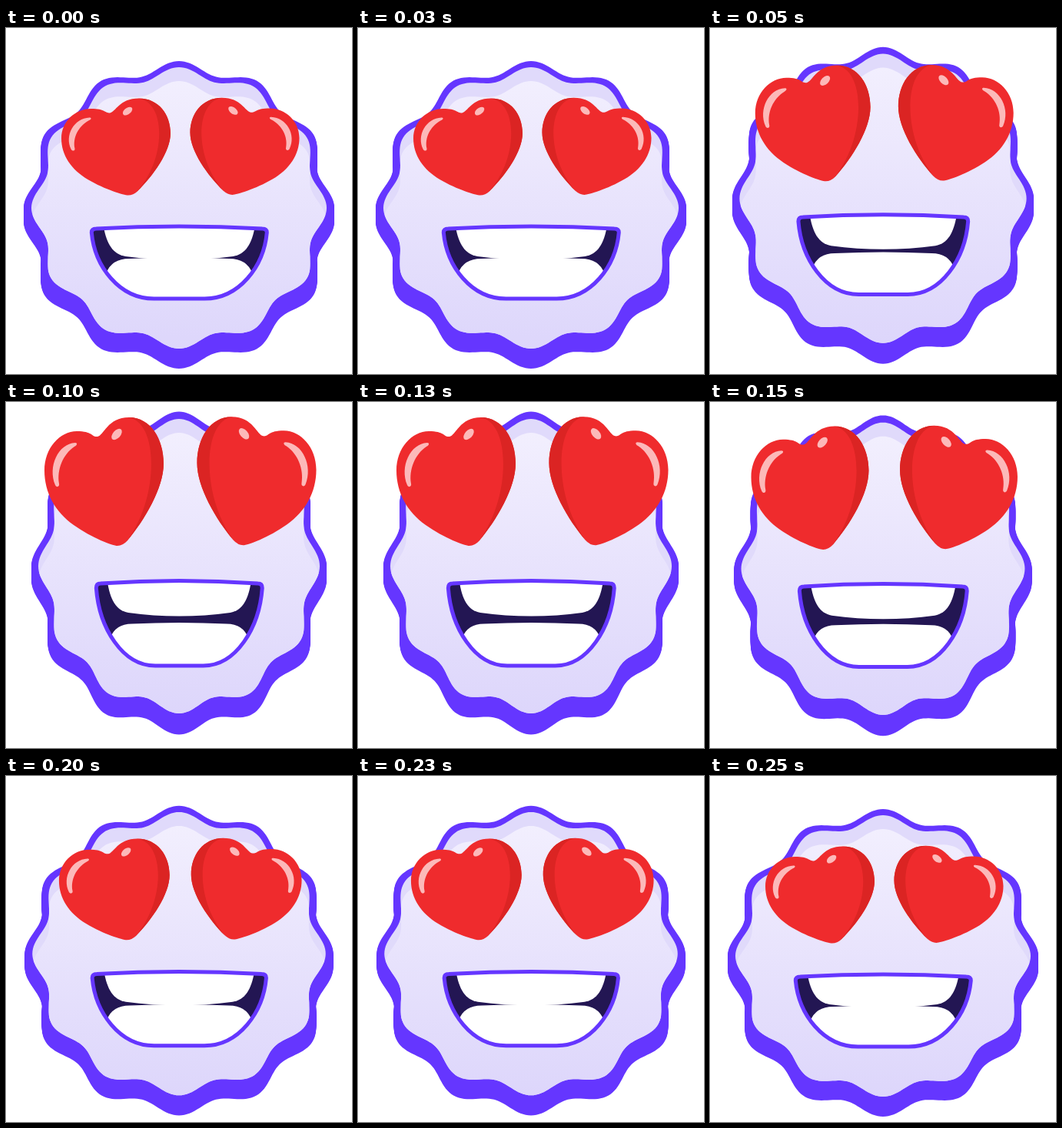
An HTML page with a canvas for the animation above (300 ms loop, 450 by 450 pixels).

```html
<!DOCTYPE html>
<html>
<head>
<meta charset="utf-8">
<title>Heart eyes</title>
<style>
html, body { margin: 0; overflow: hidden; background: #fff; }
canvas { display: block; }
</style>
</head>
<body>
<canvas id="stage" width="450" height="450"></canvas>
<script>
const ctx = document.getElementById('stage').getContext('2d');
const PURPLE = '#6536ff', RED = '#ef2b2d', SHADE = '#db2423', SHINE = '#fcb9b9', DARK = '#231653';

// Stretch of the face at each step: 0 squashed, 1 fully stretched
const STEP = 50, STRETCH = [0, 0.6, 1, 0.84, 0.14, 0];

// Heart parts from the top left corner of the stretched heart
const heart = new Path2D('M95,167C89,167 62,157 38,140S0,98 0,69 20,18 42,18 61,26 69,25 82,0 110,0 155,28 155,60 130,134 108,160Q102,167 95,167');
const heartShade = new Path2D('M108,0C150,4 150,110 103,166H170V0Z');
const shine = new Path2D('M40,33C18,34 4,64 14,88 16,92 20,90 19,86 16,68 24,48 39,38 43,36 43,33 40,33');

// Mouth parts of the squashed face, from the middle line
const mouth = new Path2D('M-33,352C-78,352 -110,310 -114,266Q-114,261 -108,261Q0,255 108,261Q114,261 114,266C110,310 78,352 33,352Z');
const upperTeeth = new Path2D('M-99,255C-95,280 -87,294 -70,297Q0,306 70,297C87,294 95,280 99,255Z');
const lowerTeeth = new Path2D('M-95,319Q-88,300 -65,300Q0,297 65,300Q88,300 95,319V400H-95Z');

const mix = (a, b, p) => a + (b - a) * p;

function fill(path, color) {
  ctx.fillStyle = color;
  ctx.fill(path);
}

function badge(cy, rx, ry) {
  const path = new Path2D();
  for (let a = 0; a < 2 * Math.PI; a += Math.PI / 180) {
    const r = 0.962 + 0.038 * Math.cos(12 * a);
    path.lineTo(225 + rx * r * Math.sin(a), cy - ry * r * Math.cos(a));
  }
  path.closePath();
  return path;
}

function drawBody(p) {
  const cy = mix(234, 213.5, p), depth = 18;
  for (let d = 0; d <= depth; d++) {
    fill(badge(cy + d, mix(202, 192, p), mix(191, 201, p)), PURPLE);
  }
  const rx = mix(192, 183, p), ry = mix(183, 191.5, p);
  const face = badge(cy, rx, ry);
  const light = ctx.createLinearGradient(0, cy - ry, 0, cy + ry);
  light.addColorStop(0, '#f3f0fe');
  light.addColorStop(1, '#ddd6fb');
  ctx.save();
  fill(face, '#e0dafb');
  ctx.clip(face);
  fill(badge(cy + depth, rx, ry), light);
  ctx.restore();
}

function drawMouth(p) {
  const place = (path, sy, dy) => {
    const placed = new Path2D();
    placed.addPath(path, new DOMMatrix([mix(1, 0.947, p), 0, 0, sy, 225.3, dy]));
    return placed;
  };
  const sy = mix(1, 1.175, p);
  const lips = place(mouth, sy, mix(352, 343, p) - 352 * sy);
  ctx.save();
  fill(lips, DARK);
  ctx.clip(lips);
  fill(place(upperTeeth, 1, -23 * p), '#fff');
  fill(place(lowerTeeth, 1, -11.5 * p), '#fff');
  ctx.restore();
  ctx.strokeStyle = PURPLE;
  ctx.lineWidth = 5;
  ctx.stroke(lips);
}

function drawHeart(p) {
  ctx.save();
  ctx.translate(mix(72, 50, p), mix(91.5, 20, p));
  ctx.scale(mix(0.916, 1, p), mix(0.755, 1, p));
  fill(shine, SHINE);
  fill(heart, RED);
  ctx.clip(heart);
  fill(heartShade, SHADE);
  fill(shine, SHINE);
  ctx.beginPath();
  ctx.ellipse(94, 22, 8.5, 5, -0.85, 0, 2 * Math.PI);
  ctx.fill();
  ctx.restore();
}

function draw(now) {
  const p = STRETCH[Math.floor(now / STEP) % STRETCH.length];
  ctx.clearRect(0, 0, 450, 450);
  drawBody(p);
  drawMouth(p);
  drawHeart(p);
  ctx.save();
  ctx.translate(453.5, -0.7);
  ctx.scale(-1, 1);
  drawHeart(p);
  ctx.restore();
}

const start = performance.now();
function loop() {
  draw(performance.now() - start);
  requestAnimationFrame(loop);
}
loop();
</script>
</body>
</html>
```
